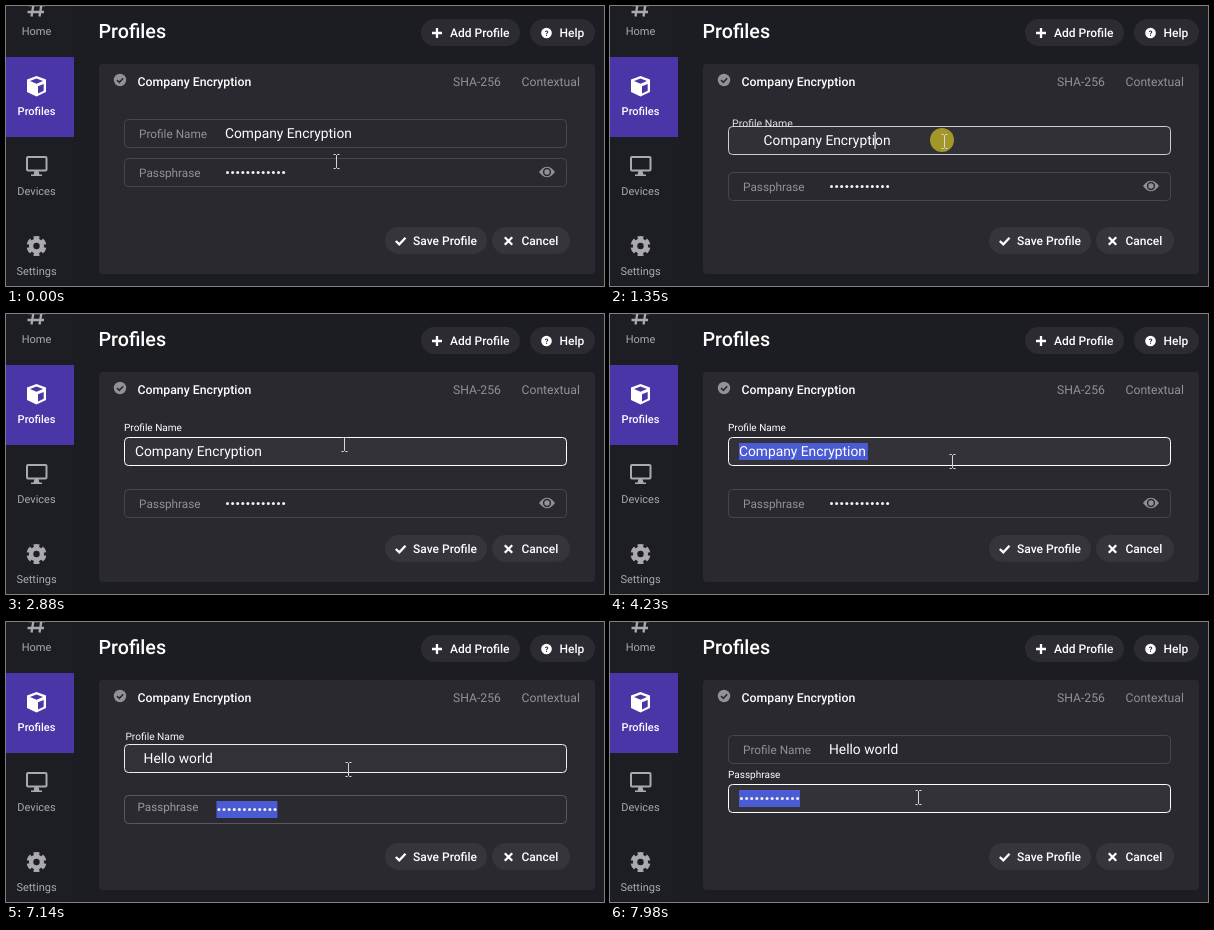
An HTML page for the animation above (8 s loop, 598 by 280 pixels).

```html
<!DOCTYPE html>
<html lang="en">
<head>
<meta charset="utf-8">
<title>Profiles</title>
<style>
  html, body { margin: 0; width: 100%; height: 100%; overflow: hidden; background: #1c1d22; }
  svg { display: block; width: 598px; height: 280px; }
  text { font-family: Roboto, Inter, sans-serif; text-rendering: geometricPrecision; white-space: pre; fill: #fff; font-size: 12px; }
  .nav text { font-size: 11px; fill: #a9a9ae; text-anchor: middle; }
  .nav .active { fill: #fff; font-weight: 500; }
  .title { font-size: 19.7px; font-weight: 500; }
  .strong { font-weight: 500; font-size: 12.3px; }
  .button { font-weight: 500; }
  .muted { fill: #929197; font-size: 12.2px; }
  .value { font-size: 13.8px; }
  .line { fill: none; stroke: #fff; stroke-width: 2.3; }
  .pill { fill: #36353b; }
  .selection { fill: #4a5bd4; }
</style>
</head>
<body>
<svg viewBox="0 0 598 280" xmlns="http://www.w3.org/2000/svg">
  <rect width="598" height="280" fill="#1c1d22"/>
  <g class="nav">
    <rect width="68" height="280" fill="#1d1e23"/>
    <rect y="51" width="68" height="80" fill="#4b36a7"/>
    <path d="M28.500-8L25.500 10.500M36.500-8L33.500 10.500M21.500 6H38M22.500 -1H39" fill="none" stroke="#a9a9ae" stroke-width="2.300"/>
    <text x="30.500" y="29">Home</text>
    <path d="M30.500 70L40 73.500V86L30.500 90.500L21 86V73.500Z" fill="#fff"/>
    <path d="M30.500 72.500L37 75L30.500 77.700L24 75ZM32 80.300L37.700 77.900V84.800L32 87.500Z" fill="#4b36a7"/>
    <text class="active" x="30.500" y="109">Profiles</text>
    <rect x="21" y="151" width="19.500" height="13.500" rx="1" fill="none" stroke="#a9a9ae" stroke-width="2"/>
    <path d="M28.500 165H32.500L33.500 168.500H36V170H25V168.500H27.500Z" fill="#a9a9ae"/>
    <text x="30.500" y="189">Devices</text>
    <g fill="none" stroke="#a9a9ae">
      <circle cx="30.500" cy="240" r="5.400" stroke-width="4.400"/>
      <circle cx="30.500" cy="240" r="8.300" stroke-width="3.400" pathLength="12" stroke-dasharray="1.300 .7" stroke-dashoffset="-.35"/>
    </g>
    <text x="30.500" y="269">Settings</text>
  </g>

  <text class="title" x="92.500" y="32">Profiles</text>
  <rect x="415" y="13" width="99" height="27" rx="13.500" fill="#2b2b31"/>
  <path class="line" d="M426 27H436M431 22V32"/>
  <text class="button" x="444" y="31">Add Profile</text>
  <rect x="524" y="13" width="65" height="27" rx="13.500" fill="#2b2b31"/>
  <circle cx="540.500" cy="27" r="5.300" fill="#fff"/>
  <text x="540.500" y="29.800" text-anchor="middle" style="font-size:7.500px;font-weight:700;fill:#2b2b31">?</text>
  <text class="button" x="553.500" y="31">Help</text>

  <rect x="93" y="58" width="496" height="210" rx="4" fill="#2a2930"/>
  <circle cx="114" cy="74" r="6.200" fill="#929197"/>
  <path d="M111 74L113.300 76.300L117.200 72.200" fill="none" stroke="#2a2930" stroke-width="1.600"/>
  <text class="strong" x="131.500" y="80">Company Encryption</text>
  <text class="muted" x="447" y="80">SHA-256</text>
  <text class="muted" x="515.500" y="80">Contextual</text>

  <g id="fields"></g>

  <rect class="pill" x="379" y="221" width="102" height="27" rx="13.500"/>
  <path class="line" d="M389.800 235L393.300 238.300L399.500 231.700"/>
  <text class="button" x="407" y="239">Save Profile</text>
  <rect class="pill" x="486" y="221" width="78" height="27" rx="13.500"/>
  <path class="line" d="M498.800 231.300L506.200 238.700M506.200 231.300L498.800 238.700"/>
  <text class="button" x="515.500" y="239">Cancel</text>

  <circle id="click" cx="332" cy="134" r="12" fill="#efdc1e" opacity=".6"/>
  <path id="beam" d="M-3-7H-1M1-7H3M-3 7H-1M1 7H3M-1-7L0-6L1-7M-1 7L0 6L1 7M0-6V6" fill="none" stroke="#d8d8da"/>
  <path id="arrow" d="M0 0V15.500L3.600 12.200L6.200 18L8.800 16.900L6.300 11.200H11Z" fill="#fff" stroke="#15151a" stroke-width=".8"/>
</svg>
<script>
const LOOP = 8000;
const $ = id => document.getElementById(id);
const set = (el, attrs) => { for (const k in attrs) el.setAttribute(k, attrs[k]); };
const show = (el, on) => set(el, { visibility: on ? 'visible' : 'hidden' });
const clamp = v => Math.min(1, Math.max(0, v));
const mix = (a, b, p) => a + (b - a) * p;
const snap = v => Math.floor(v) + 0.5;
const ramp = (t, from, to) => 1 - (1 - clamp((t - from) / (to - from))) ** 2.7;
const gray = (a, b, p) => 'rgb(' + a.map((v, i) => Math.round(mix(v, b[i], p))) + ')';

// Fields share one structure; the label floats above the box on focus.
const makeField = (id, label, content) => `
  <rect id="${id}Box" x="118.5" width="442" height="28" rx="4"/>
  <text id="${id}Label">${label}</text>
  <g id="${id}Value"><rect id="${id}Sel" class="selection" y="-8.500" height="17"/>${content}</g>`;
const dots = Array.from({ length: 12 }, (_, i) =>
  `<circle cx="${(2.5 + i * 5.1).toFixed(1)}" cy="0" r="1.500" fill="#f4f4f6"/>`).join('');

$('fields').innerHTML =
  makeField('name', 'Profile Name',
    '<text id="typed" class="value" y="4.700"></text><path id="caret" d="M0-8.500V8.500" stroke="#fff"/>') +
  makeField('pass', 'Passphrase', dots) +
  `<g id="eye"><path d="M-8 0Q0-10.500 8 0Q0 10.500-8 0Z" fill="#929197"/>
   <circle r="3.400" fill="none" stroke="#2a2930" stroke-width="1.500"/></g>`;

const typing = [
  [0, 'Company Encryption'], [4560, 'H'], [4670, 'He'], [4780, 'Hel'], [4960, 'Hell'], [5060, 'Hello'],
  [5580, 'Hello '], [5650, 'Hello w'], [5710, 'Hello wo'], [5780, 'Hello wor'], [5840, 'Hello worl'], [5900, 'Hello world']
];
const caretSpans = [[1340, 1820], [2190, 2840], [3560, 4140], [4560, 6420], [6950, 7140]];
const pointer = [
  [0, 330.5, 155.5], [19, 330.5, 155.5], [20, 328.5, 153.5], [330, 328.5, 153.5], [430, 328.5, 160.5], [670, 334.5, 135.5],
  [2830, 334.5, 135.5], [2880, 338.5, 130.5], [2930, 340.5, 134.5],
  [3240, 340.5, 134.5], [3620, 342.5, 147.5], [7770, 342.5, 147.5], [7980, 308.5, 175.5], [8000, 308.5, 175.5]
];

function pointerAt(t) {
  const i = Math.max(1, pointer.findIndex(k => k[0] > t));
  const [a, b] = [pointer[i - 1], pointer[i]];
  const p = (t - a[0]) / (b[0] - a[0]);
  const s = p * p * (3 - 2 * p);
  return [1, 2].map(n => snap(mix(a[n], b[n], s)));
}

function drawField(id, y, focus) {
  set($(id + 'Box'), {
    y,
    fill: gray([42, 41, 48], [51, 50, 57], focus),
    stroke: gray([71, 70, 77], [255, 255, 255], focus)
  });
  set($(id + 'Label'), {
    transform: `translate(${mix(133, 118, focus)} ${y + mix(18.3, -6.5, focus)}) scale(${mix(1, 0.85, focus)})`,
    style: `font-size:11.800px;fill:${gray([146, 145, 151], [255, 255, 255], focus)}`
  });
  set($(id + 'Value'), { transform: `translate(${mix(219, 129, focus)} ${y + 14})` });
}

function draw(t) {
  const blur = ramp(t, 7135, 7300);
  const nameFocus = ramp(t, 1290, 1450) * (1 - blur);
  const passY = snap(152.5 + 10 * (nameFocus + blur) + 13 * nameFocus ** 2);
  drawField('name', snap(113.5 + 10 * nameFocus), nameFocus);
  drawField('pass', passY, blur);

  const typed = $('typed');
  typed.textContent = typing.filter(k => k[0] <= t).pop()[1];
  const caretX = t < 3250 ? typed.getSubStringLength(0, 16) : typed.getComputedTextLength();
  set($('caret'), { transform: `translate(${Math.round(caretX) + 0.5} 0)` });
  show($('caret'), caretSpans.some(([on, off]) => t >= on && t < off));
  set($('nameSel'), { width: typed.getComputedTextLength() + 2 });
  show($('nameSel'), t >= 4220 && t < 4560);
  set($('passSel'), { width: 61 });
  show($('passSel'), blur > 0);

  set($('eye'), { transform: `translate(541 ${passY + 13.5})` });
  show($('eye'), blur === 0);

  const [x, y] = pointerAt(t);
  const isArrow = t >= 7170 && y < 163;
  set($('beam'), { transform: `translate(${x} ${y})` });
  set($('arrow'), { transform: `translate(${x - 1.5} ${y})` });
  show($('beam'), !isArrow);
  show($('arrow'), isArrow);
  show($('click'), t >= 1260 && t < 1370);
}

const start = performance.now();
function tick() {
  draw((performance.now() - start) % LOOP);
  requestAnimationFrame(tick);
}
tick();
</script>
</body>
</html>
```
